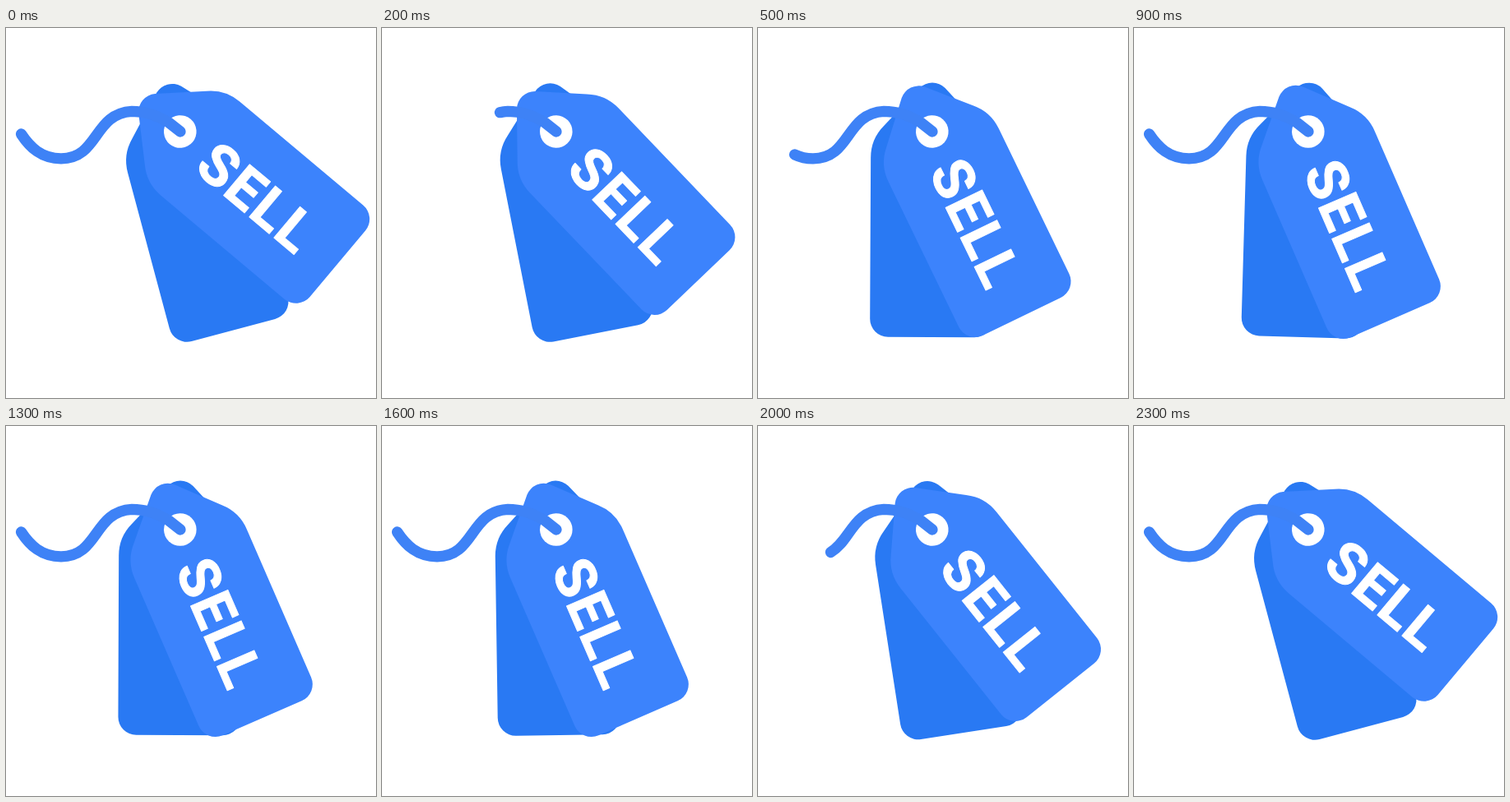
Animation, 450 px wide and 450 px high, one loop 2.4 s. Source, as an HTML page:

```html
<!DOCTYPE html>
<html lang="en">
<head>
<meta charset="utf-8">
<title>Sell tags</title>
<style>
  html, body { margin: 0; width: 100%; height: 100%; overflow: hidden; background: #fff; }
  svg { display: block; width: 100%; height: 100%; }
  text { font: 700 69.5px Roboto, Arial, sans-serif; letter-spacing: 1.7px; }
</style>
</head>
<body>
<svg viewBox="0 0 450 450">
  <defs>
    <!-- Tag lying along +x, with its hole at the origin -->
    <path id="tag" d="M-53-15.500L-7-58.500A55 55 0 0 1 32-74.500H228A22 22 0 0 1 250-52.500V52.500A22 22 0 0 1 228 74.500H32A55 55 0 0 1-7 58.500L-53 15.500A22 22 0 0 1-53-15.500Z"/>
  </defs>
  <use id="back" href="#tag" fill="#2979f3"/>
  <g id="front">
    <use href="#tag" fill="#3c83fc"/>
    <circle r="19.8" fill="#fff"/>
    <text x="41.500" y="25.500" fill="#fff" stroke="#fff" stroke-width="1" stroke-linejoin="round">SELL</text>
  </g>
  <path id="string" pathLength="1" fill="none" stroke="#3e82f6" stroke-width="13.3" stroke-linecap="round"
    d="M212 126L198 115C181 104 166 101.300 153 101.300C106 104 113 158.800 67 158.800C43 158.800 29 145 18.500 129"/>
</svg>
<script>
  const LOOP = 2400, STEP = 100;
  const [back, front, string] = ['back', 'front', 'string'].map(id => document.getElementById(id));

  const progress = (t, from, to) => Math.min(1, Math.max(0, (t - from) / (to - from)));
  const ease = (t, from, to) => (1 - Math.cos(Math.PI * progress(t, from, to))) / 2;
  const pose = (el, angle) => el.setAttribute('transform', `translate(211.8 126) rotate(${angle})`);

  function draw(t) {
    pose(front, 40 + 26.5 * (ease(t, 0, 620) - ease(t, 1630, 2310)));
    // The back tag drifts slowly before it swings home
    pose(back, 75 + 17 * ease(t, 0, 630) - 3 * progress(t, 800, 1640) - 14 * ease(t, 1640, 2310));

    // The string is drawn out afresh at the start of each swing
    const shown = t < 20 ? 1 : t < 1630 ? progress(t, 15, 590) : progress(t, 1630, 2200);
    string.setAttribute('stroke-dasharray', `${shown} 2`);
  }

  const start = performance.now();
  function tick() {
    const t = (performance.now() - start) % LOOP;
    draw(Math.floor(t / STEP) * STEP);
    requestAnimationFrame(tick);
  }
  tick();
</script>
</body>
</html>
```
